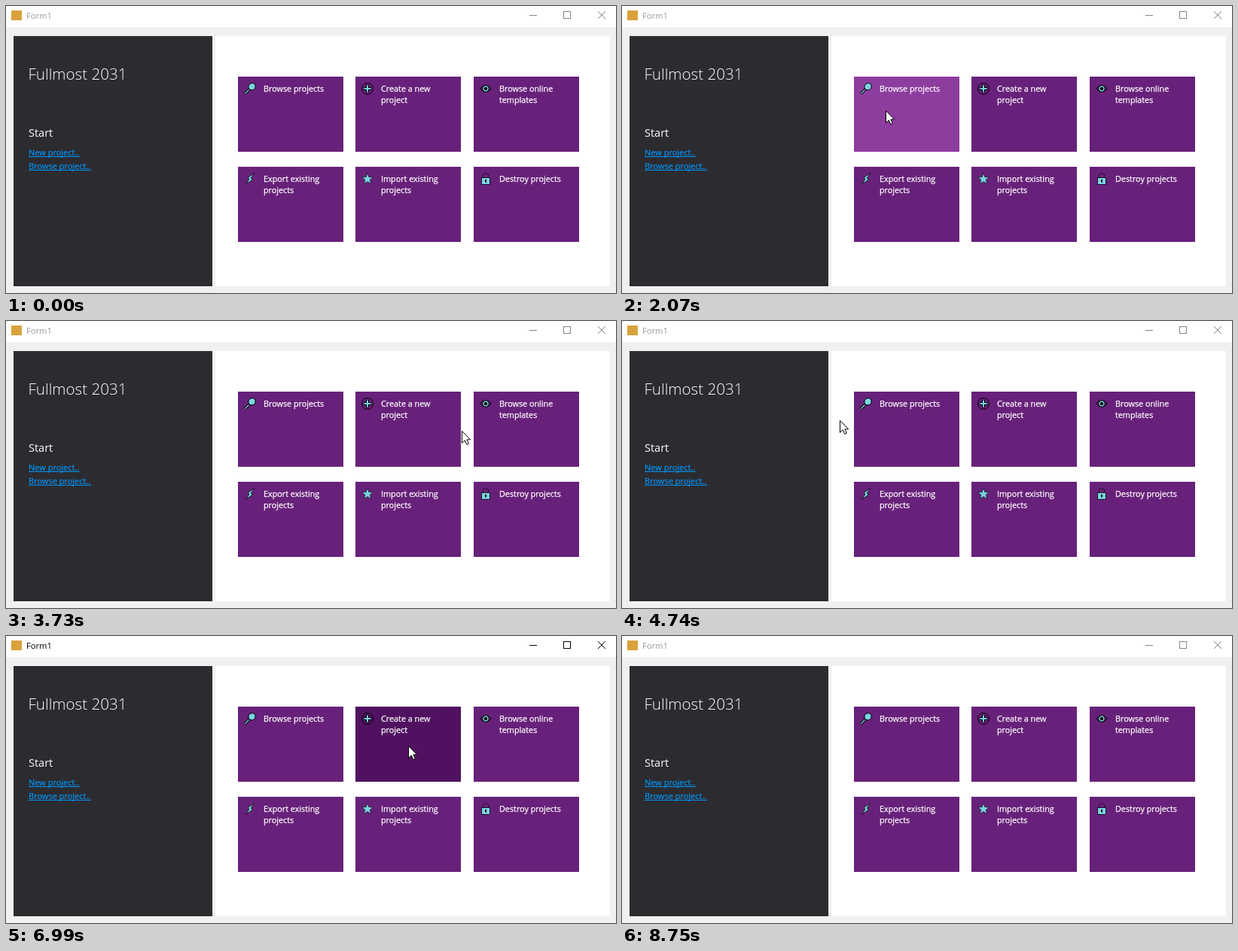
An HTML page that plays this animation: 810x382 px, repeating every 8.85 s.

```html
<!DOCTYPE html>
<html lang="en">
<head>
<meta charset="utf-8">
<title>Form1</title>
<style>
html, body { margin: 0; width: 100%; height: 100%; overflow: hidden; background: #f0f0f0; }
svg { display: block; width: 810px; height: 382px; font-family: "Open Sans", "Noto Sans", sans-serif; }
text { white-space: pre; }
.caption { color: #999; }
.caption text { fill: currentColor; font-size: 11.2px; }
.caption path { stroke: #858585; fill: none; }
.caption.active { color: #000; }
.caption.active path { stroke: #000; }
.heading { fill: #fff; font-size: 20.6px; font-weight: 300; }
.subheading { fill: #fff; font-size: 14.5px; }
.link { fill: #0097fb; stroke: #0097fb; stroke-width: .2; font-size: 11px; }
.label { fill: #fff; stroke: #fff; stroke-width: .25; font-size: 10.8px; }
.icon { fill: #7ad3e2; stroke: #000; }
</style>
</head>
<body>
<svg viewBox="0 0 810 382">
  <rect width="810" height="382" fill="#f0f0f0"/>
  <rect width="810" height="28" fill="#fff"/>
  <rect x="7" y="6" width="14" height="13" fill="#d9a23c"/>
  <g class="caption" id="caption">
    <text x="27" y="17">Form1</text>
    <path d="M695 12.5H705M740.5 7.5H749.5V16.5H740.5Z" shape-rendering="crispEdges"/>
    <path d="M786 7L796 17M796 7L786 17"/>
  </g>
  <rect x="10" y="40" width="264" height="333" fill="#2c2b30"/>
  <rect x="278" y="40" width="524" height="333" fill="#fff"/>
  <text class="heading" x="29.5" y="98">Fullmost 2031</text>
  <text class="subheading" x="30" y="174">Start</text>
  <text class="link" x="30" y="199">New project..</text>
  <text class="link" x="30" y="217">Browse project..</text>
  <path d="M30 200.5H98M30 218.5H113" stroke="#0097fb"/>
  <g id="tiles"></g>
  <path id="cursor" d="M.5 .5V16.5L4.3 12.9L6.8 18.5L9.3 17.4L6.9 11.9H11.7Z" fill="#fff" stroke="#000"/>
</svg>
<script>
const LOOP = 8850;
const BASE = '#68217a', HOVER = '#8d3d9e', PRESSED = '#501260';
const TILE = { width: 140, height: 100 };

// Icons are drawn in a 16 by 16 box
const icons = {
  search: '<path d="M7 9L1 15" stroke-width="3.4"/><path d="M6.5 9.5L1.3 14.7" stroke="#7ad3e2" stroke-width="1.4"/>' +
    '<path d="M8 1.5L11.5 .5L15 2.5V7L12 10L8 9.5L6 7V4Z"/>',
  plus: '<circle cx="8" cy="8" r="7.5" fill="none"/>' +
    '<path d="M8 3V13M3 8H13" stroke-width="4"/><path d="M8 3.5V12.5M3.5 8H12.5" stroke="#7ad3e2" stroke-width="2"/>',
  eye: '<path d="M.7 8Q8 -1 15.3 8Q8 17 .7 8Z" fill="none"/>' +
    '<circle cx="8" cy="8" r="4.2"/><circle cx="8" cy="8" r="1.8" fill="#000"/>',
  bolt: '<path d="M13.5 .7L5 6.5L7 8.3L2.5 15.3L11.5 9.2L9.3 7.3Z" stroke-width=".8"/>',
  star: `<path d="${starPath(8, 8.4, 8, 3.3)}" stroke-width=".6"/>`,
  lock: '<path d="M4.5 7V3.5Q4.5 .7 8 .7Q11.5 .7 11.5 3.5V7" fill="none" stroke-dasharray="2 1"/>' +
    '<rect x="2.5" y="6.5" width="11" height="9" stroke-width=".8"/><path d="M8 9V12.5" stroke-width="2"/>'
};

// Three tiles to a row
const tiles = [
  ['search', 'Browse projects'],
  ['plus', 'Create a new', 'project'],
  ['eye', 'Browse online', 'templates'],
  ['bolt', 'Export existing', 'projects'],
  ['star', 'Import existing', 'projects'],
  ['lock', 'Destroy projects']
].map(([icon, ...lines], i) => ({
  icon, lines,
  x: Math.round(308 + 156.4 * (i % 3)),
  y: 94 + 120 * Math.floor(i / 3)
}));

// The pointer rests until a gesture starts, then eases from stop to stop
const entry = { x: 372, y: 384 };
const gestures = [
  { start: 1220, stops: [{ end: 1630, x: 378, y: 150 }] },
  { start: 1810, stops: [{ end: 2070, x: 350, y: 139 }, { end: 2470, x: 500, y: 142 }] },
  { start: 2700, stops: [{ end: 2900, x: 425, y: 140 }, { end: 3160, x: 483, y: 140 }, { end: 3540, x: 650, y: 142 }] },
  { start: 3630, stops: [{ end: 4200, x: 55, y: 196 }, { end: 4500, x: 84, y: 172 }] },
  { start: 4540, stops: [{ end: 4740, x: 289, y: 132 }, { end: 5240, x: 381, y: 150 }] },
  { start: 6250, stops: [{ end: 6670, x: 534, y: 146 }] },
  { start: 7860, stops: [{ end: 8520, x: 760, y: 384 }] }
];
const presses = [[5240, 5610], [5940, 6250], [6990, 7310], [7590, 7860]];
const focus = [5240, 8750];

const byId = id => document.getElementById(id);
const within = (v, [from, to]) => v >= from && v < to;
const ease = k => (1 - Math.cos(Math.PI * k)) / 2;

function starPath(cx, cy, outer, inner) {
  const points = Array.from({ length: 10 }, (_, i) => {
    const r = i % 2 ? inner : outer, a = i * Math.PI / 5;
    return `${(cx + r * Math.sin(a)).toFixed(2)} ${(cy - r * Math.cos(a)).toFixed(2)}`;
  });
  return `M${points.join('L')}Z`;
}

byId('tiles').innerHTML = tiles.map(({ x, y, icon, lines }) =>
  `<g transform="translate(${x} ${y})"><rect width="${TILE.width}" height="${TILE.height}"/>` +
  `<g class="icon" transform="translate(8 8)">${icons[icon]}</g>` +
  lines.map((line, i) => `<text class="label" x="34" y="${20 + 15 * i}">${line}</text>`).join('') +
  '</g>').join('');
const faces = [...document.querySelectorAll('#tiles > g > rect')];

function pointerAt(t) {
  let { x, y } = entry;
  for (const { start, stops } of gestures) {
    let from = start;
    for (const stop of stops) {
      if (t < from) return { x, y };
      const k = ease(Math.min(1, (t - from) / (stop.end - from)));
      x += (stop.x - x) * k;
      y += (stop.y - y) * k;
      from = stop.end;
    }
  }
  return { x, y };
}

function draw(t) {
  const pointer = pointerAt(t);
  const px = Math.round(pointer.x), py = Math.round(pointer.y);
  const pressed = presses.some(p => within(t, p));
  byId('cursor').setAttribute('transform', `translate(${px} ${py})`);
  byId('caption').classList.toggle('active', within(t, focus));
  tiles.forEach(({ x, y }, i) => {
    const over = within(px, [x, x + TILE.width]) && within(py, [y, y + TILE.height]);
    faces[i].setAttribute('fill', over ? (pressed ? PRESSED : HOVER) : BASE);
  });
}

const start = performance.now();
function tick() {
  draw((performance.now() - start) % LOOP);
  requestAnimationFrame(tick);
}
tick();
</script>
</body>
</html>
```
